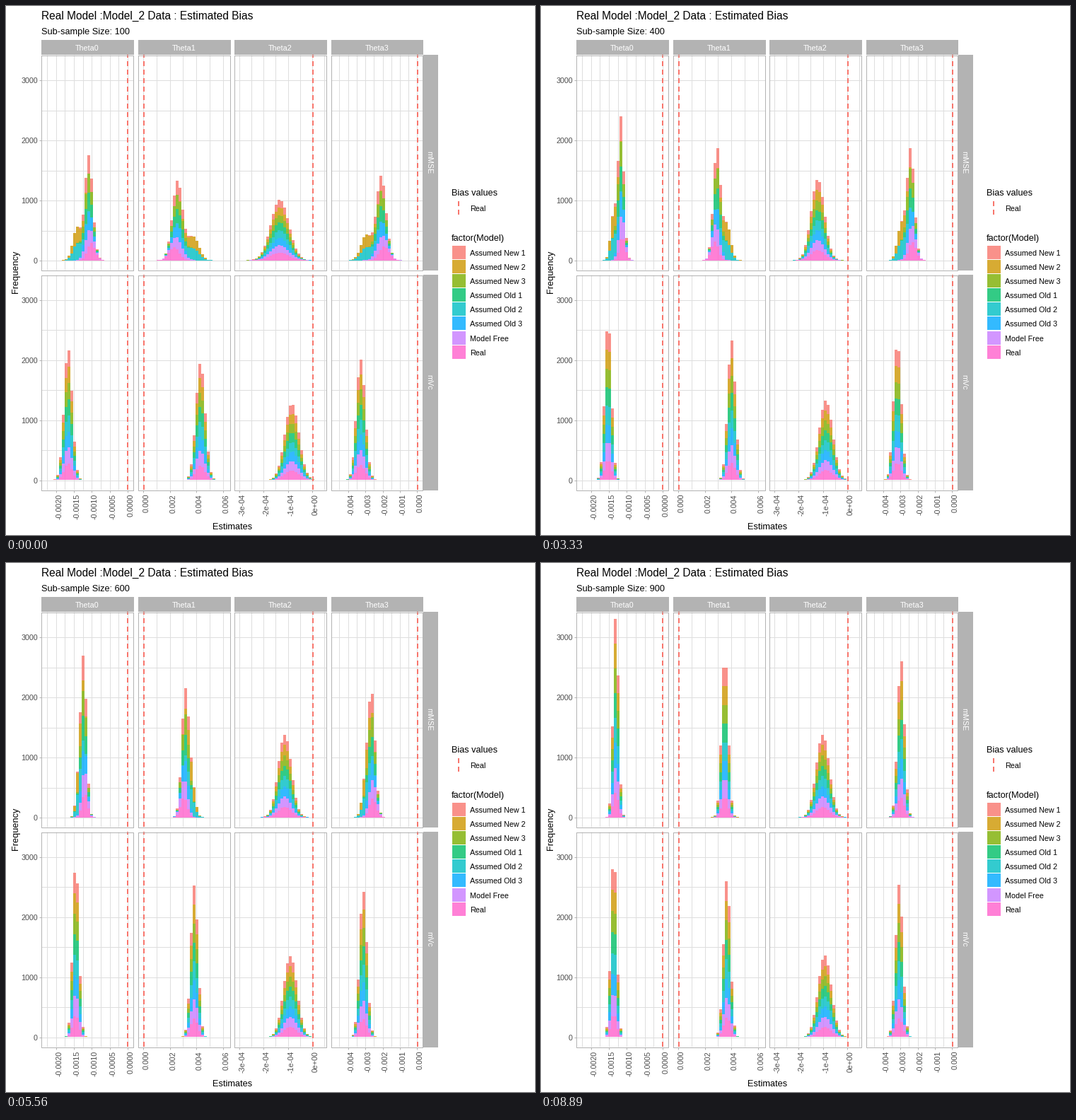
A matplotlib script that plays this animation: 748x748 px, repeating every 10000 ms.

```python
import math
import numpy as np
import matplotlib.pyplot as plt
from matplotlib.animation import FuncAnimation
from matplotlib.collections import PolyCollection
from matplotlib.patches import Rectangle

plt.rcParams["font.family"] = "Liberation Sans"

SIDE, DPI = 748, 100
PT = 72 / DPI
GREY, GRID, TEXT, RED = "#B3B3B3", "#DEDEDE", "#4D4D4D", "#F8766D"
SMALL, MEDIUM, TITLE = 10.8, 12.8, 15.5

MODELS = {
    "Assumed New 1": "#F8766D", "Assumed New 2": "#CD9600",
    "Assumed New 3": "#7CAE00", "Assumed Old 1": "#00BE67",
    "Assumed Old 2": "#00BFC4", "Assumed Old 3": "#00A9FF",
    "Model Free": "#C77CFF", "Real": "#FF61CC",
}
ALPHA = 0.8
RUNS = 1000
BIN = 3.97    # pixels per histogram bin
UNIT = 0.085  # pixels per count

# x of zero, direction, pixels and value per tick, tick count, tick format
AXES = [
    (172.4, -1, 25.3, 0.0005, 5, ".4f"),
    (194.7, 1, 37.5, 0.002, 4, ".3f"),
    (433.7, -1, 34.5, 0.0001, 4, ".0e"),
    (581.8, -1, 24.4, 0.001, 5, ".3f"),
]
ROWS = ["mMSE", "mVc"]

# In bins: first and last mean, first and last spread, first gap of the late pair
FITS = {
    "mMSE": [(14.1, 16.8, 1.25, 0.9, 4), (12.3, 16.5, 1.65, 1.13, 5.4),
             (11.7, 8.9, 3.15, 2.3, 0), (13.0, 18.25, 1.55, 1.17, 5.1)],
    "mVc": [(21.28, 17.52, 1.42, 0.98, 0), (20.26, 17.25, 1.6, 1.17, 0),
            (7.45, 8.2, 2.49, 2.33, 0), (20.1, 18.87, 1.56, 1.22, 0)],
}
BEND = {"mMSE": 0, "mVc": 0.4}   # early lead of the mean
SETTLE = {"mMSE": 6, "mVc": 2}   # how fast the spread settles

SIZES = range(100, 1000, 100)
FRAMES, LOOP = 100, 10000
STEPS = np.arange(-3, 30)
EDGES = np.arange(-3, 31) - 0.5
erf = np.vectorize(math.erf)


def counts(mean, sd):
    cdf = 0.5 * (1 + erf((EDGES - mean) / (sd * math.sqrt(2))))
    return RUNS * np.diff(cdf)


def params(row, col, model, s):
    """Mean and spread of one model; s runs from 0 to 1 over the sizes."""
    m0, m1, sd0, sd1, gap = FITS[row][col]
    mean = m0 + (m1 - m0) * (s + BEND[row] * s * (1 - s))
    sd = sd1 + (sd0 - sd1) * (1 - s) ** SETTLE[row]
    gap *= 1 - s
    if model.endswith("2"):
        return mean + gap, sd * (1 + 0.04 * gap)
    if model == "Model Free":
        return mean - 0.3 * gap * s, sd * (1 + 0.04 * gap)
    if model == "Real":
        return mean - 0.25 * gap, sd * (1 + 0.02 * gap)
    return mean, sd


def baseline(r):
    return 359.6 + 310.8 * r


def bars(size):
    """Stacked rectangles for every panel, bottom model first."""
    s = (size - SIZES[0]) / (SIZES[-1] - SIZES[0])
    verts = []
    for r, row in enumerate(ROWS):
        for c, (zero, sign, *_) in enumerate(AXES):
            mid = zero + sign * STEPS * BIN
            x0, x1 = np.round(mid - BIN / 2), np.round(mid + BIN / 2)
            low = np.zeros(len(STEPS))
            for model in reversed(MODELS):
                high = low + counts(*params(row, c, model, s))
                y0 = np.round(baseline(r) - UNIT * low)
                y1 = np.round(baseline(r) - UNIT * high)
                verts += [[(a, p), (b, p), (b, q), (a, q)]
                          for a, b, p, q in zip(x0, x1, y0, y1)]
                low = high
    return verts


fig = plt.figure(figsize=(SIDE / DPI, SIDE / DPI), dpi=DPI, facecolor="white")
ax = fig.add_axes([0, 0, 1, 1])
ax.set_xlim(0, SIDE)
ax.set_ylim(SIDE, 0)
ax.axis("off")


def pix(v):
    return math.floor(v) + 0.5


def line(x, y, color=GRID, width=1, z=1, **kw):
    ax.plot(x, y, color=color, lw=width * PT, zorder=z,
            solid_capstyle="butt", dash_capstyle="butt", **kw)


def dashes(x, bottom, top):
    line([round(x)] * 2, [bottom, top], RED, 2, 4, ls=(0, (3.5, 2.5)))


def box(x0, y0, x1, y1, color, **kw):
    ax.add_patch(Rectangle((x0, y0), x1 - x0, y1 - y0, fc=color, lw=0,
                           antialiased=False, **kw))


def label(x, y, text, px=SMALL, color="black", ha="left", turn=0):
    return ax.text(x, y, text, fontsize=px * PT, color=color, ha=ha,
                   va="baseline", rotation=turn, rotation_mode="anchor")


def span(c):
    left = 50.4 + 136.4 * c
    return round(left), round(left + 129.8)


def rise(r):
    top = 69 + 311 * r
    return top, top + 304


def panel(c, r):
    zero, sign, step, *_ = AXES[c]
    (left, right), (top, bottom) = span(c), rise(r)
    for half in range(-2, 12):
        x = zero + sign * half * step / 2
        if left < x < right:
            line([pix(x)] * 2, [top, bottom])
    for count in range(0, 3500, 500):
        line([left, right], [pix(baseline(r) - UNIT * count)] * 2)
    dashes(zero, bottom, top)
    l, t, b, e = left + 0.5, top + 0.5, bottom + 0.5, right + 0.5
    line([l, e, e, l, l], [t, t, b, b, t], GREY, z=5)


for c, (zero, sign, step, value, n, form) in enumerate(AXES):
    left, right = span(c)
    box(left, 48, right + 1, 69, GREY)
    label((left + right) / 2, 63, f"Theta{c}", color="white", ha="center")
    for r in range(len(ROWS)):
        panel(c, r)
    for i in range(n):
        x = zero + sign * i * step
        line([pix(x)] * 2, [685, 688], GREY)
        label(x + 7, 690, format(sign * i * value, form), color=TEXT,
              ha="right", turn=90)

for r, name in enumerate(ROWS):
    top, bottom = rise(r)
    box(590, top, 611, bottom + 1, GREY)
    label(595.5, (top + bottom) / 2, name, color="white", ha="center", turn=-90)
    for count in range(0, 4000, 1000):
        y = baseline(r) - UNIT * count
        line([47, 50], [pix(y)] * 2, GREY)
        label(45, y + 4.4, str(count), color=TEXT, ha="right")

label(50, 19, "Real Model :Model_2 Data : Estimated Bias", TITLE)
subtitle = label(50, 40, "", MEDIUM)
label(320, 740, "Estimates", MEDIUM, ha="center")
label(17, 376, "Frequency", MEDIUM, ha="center", turn=90)

label(630, 268, "Bias values", MEDIUM)
dashes(640, 295, 275)
label(656, 289.5, "Real")
label(630, 332, "factor(Model)", MEDIUM)
for i, (name, color) in enumerate(MODELS.items()):
    y = round(339.2 + 20.05 * i)
    box(631, y, 650, y + 19, color, alpha=ALPHA)
    label(656, y + 14, name)

layers = [color for color in reversed(MODELS.values()) for _ in STEPS]
stack = PolyCollection([], facecolors=layers * (len(ROWS) * len(AXES)),
                       edgecolors="none", linewidths=0, alpha=ALPHA,
                       antialiaseds=False, zorder=3)
ax.add_collection(stack, autolim=False)
stages = [bars(size) for size in SIZES]


def update(i):
    k = len(SIZES) * (i + 1) // FRAMES
    k = min(k, len(SIZES) - 1)
    subtitle.set_text(f"Sub-sample Size: {SIZES[k]}")
    stack.set_verts(stages[k])
    return stack, subtitle


anim = FuncAnimation(fig, update, frames=FRAMES, interval=LOOP // FRAMES,
                     repeat=True, repeat_delay=0)
plt.show()
```
